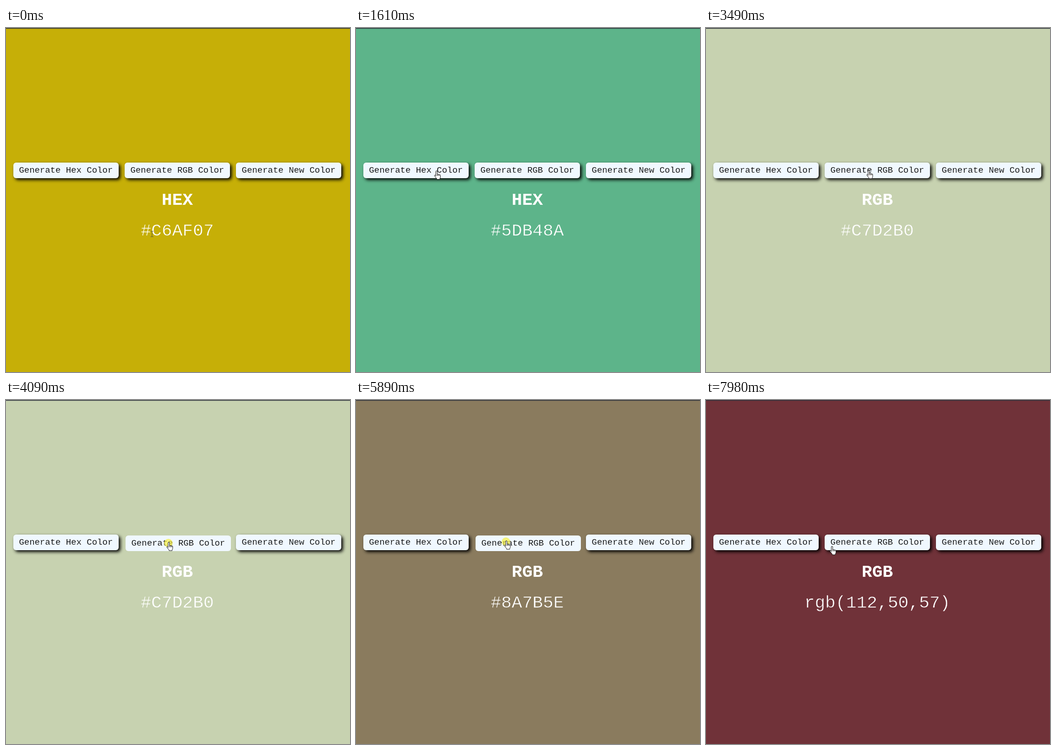
Animation of 748 by 749 pixels, one loop 8000 ms. Source, as an HTML page:

```html
<!DOCTYPE html>
<html lang="en">
<head>
<meta charset="utf-8">
<title>Color generator</title>
<style>
  html, body { margin: 0; width: 100%; height: 100%; overflow: hidden; }
  body { position: relative; font-family: "Liberation Mono", "Courier New", monospace; }
  #top { position: absolute; width: 100%; height: 1px; background: #2b2f3a; box-shadow: 0 1px #2b2f3a80; }
  .button {
    position: absolute; top: 293px; width: 229.5px; height: 34px; border-radius: 6px;
    background: aliceblue; box-shadow: 3.8px 3.8px 7.5px #000;
    font-size: 18.9px; line-height: 35px; text-align: center; white-space: pre;
    color: #000; -webkit-text-stroke: .2px aliceblue;
  }
  .button.down { transform: translate(2px, 2px); box-shadow: none; }
  .line {
    position: absolute; left: 0; width: 745px; text-align: center;
    font-size: 37.8px; line-height: 40px; color: #fff;
  }
  #label { top: 355px; font-weight: bold; }
  #value { top: 422px; }
  svg { position: absolute; left: 0; top: 0; }
</style>
</head>
<body>
<div id="top"></div>
<div class="button" style="left:15.5px">Generate Hex Color</div>
<div class="button" style="left:257.7px">Generate RGB Color</div>
<div class="button" style="left:499.9px">Generate New Color</div>
<div class="line" id="label"></div>
<div class="line" id="value"></div>
<svg width="748" height="749">
  <g id="pointer">
    <circle id="glow" cy="1.5" r="9.3" fill="#f8f03c" fill-opacity=".68"/>
    <g id="hand" transform="translate(-4 -1)" stroke="#111" fill="#fff" stroke-linejoin="round">
      <path d="M3.5 12.5V2a1.5 1.5 0 0 1 3 0V8q1.4-1.4 2.4.3q1.5-1 2.3.5q2-.7 2.3 1.2V13.5q0 2-1.3 4V19H5.5V17.5L1 12q-1.2-1.8.4-2.4q1-.2 2.1 1.4z"/>
      <path d="M6.5 8v3.5M8.9 8.3v3.2M11.2 8.8v2.7" fill="none"/>
    </g>
    <path id="arrow" d="M0 0V16l3.8-3.6 2.4 5.6 2.4-1-2.4-5.4h5.3z" fill="#fff" stroke="#111"/>
    <path id="beam" d="M-3-6h2.5l.5.5.5-.5H3M0-5.5v11M-3 6h2.5l.5-.5.5.5H3" fill="none" stroke="#5c5836"/>
  </g>
</svg>
<script>
const $ = id => document.getElementById(id);
const buttons = [...document.querySelectorAll('.button')];

// time, label, color
const colors = [
  [0, 'HEX', '#C6AF07'],
  [680, 'HEX', '#7C99C3'],
  [1610, 'HEX', '#5DB48A'],
  [2280, 'HEX', '#A91EF7'],
  [3490, 'RGB', '#C7D2B0'],
  [4160, 'RGB', 'rgb(122,72,140)'],
  [5160, 'HEX', 'rgb(96,141,118)'],
  [5750, 'RGB', '#8A7B5E'],
  [6020, 'RGB', 'rgb(12,202,135)'],
  [7030, 'RGB', 'rgb(94,118,142)'],
  [7650, 'RGB', 'rgb(112,50,57)']
];

// start, end, button
const presses = [
  [550, 680, 0], [1480, 1610, 0], [2140, 2280, 0],
  [3360, 3490, 1], [4030, 4160, 1], [4960, 5160, 0],
  [5620, 5750, 1], [5890, 6020, 1], [6890, 7030, 2], [7580, 7650, 2]
];

// start, steps, target x, target y, sag
const moves = [
  [70, 5, 174, 311.5, 0],
  [2680, 9, 353, 310, 13],
  [4420, 7, 211, 304, -8],
  [5160, 7, 326, 307, 4],
  [6160, 7, 602, 313, 9],
  [7850, 3, 273, 319, 0]
];

function pointerAt(t) {
  let x = 317.5, y = 448.5;
  for (const [start, steps, tx, ty, sag] of moves) {
    if (t < start) break;
    const p = Math.min(1, (Math.floor((t - start) / 65) + 1) / steps);
    const e = p * p * (3 - 2 * p);
    x += (tx - x) * e;
    y += (ty - y) * e + sag * Math.sin(Math.PI * p);
  }
  return [x, y];
}

function cursorKind(x, y) {
  const onButton = [15.5, 257.7, 499.9].some(left => x >= left && x <= left + 229.5);
  if (onButton && y >= 293 && y <= 327) return 'hand';
  return x > 295 && x < 451 && y > 422 && y < 462 ? 'beam' : 'arrow';
}

const show = (id, on) => $(id).style.display = on ? '' : 'none';

function draw(now) {
  const t = now % 8000;
  const [, label, color] = colors.filter(c => c[0] <= t).pop();
  document.body.style.background = color;
  $('label').textContent = label;
  $('value').textContent = color;
  // A background-colored outline thins the strokes of the large text.
  $('value').style.webkitTextStroke = '.6px ' + color;

  const press = presses.find(([start, end]) => t >= start && t < end);
  buttons.forEach((b, i) => b.classList.toggle('down', !!press && press[2] === i));
  show('glow', press);

  const [x, y] = pointerAt(t);
  $('pointer').setAttribute('transform', `translate(${x} ${y})`);
  const kind = cursorKind(x, y);
  for (const id of ['hand', 'arrow', 'beam']) show(id, id === kind);
}

const origin = performance.now();
function tick() {
  draw(performance.now() - origin);
  requestAnimationFrame(tick);
}
tick();
</script>
</body>
</html>
```
